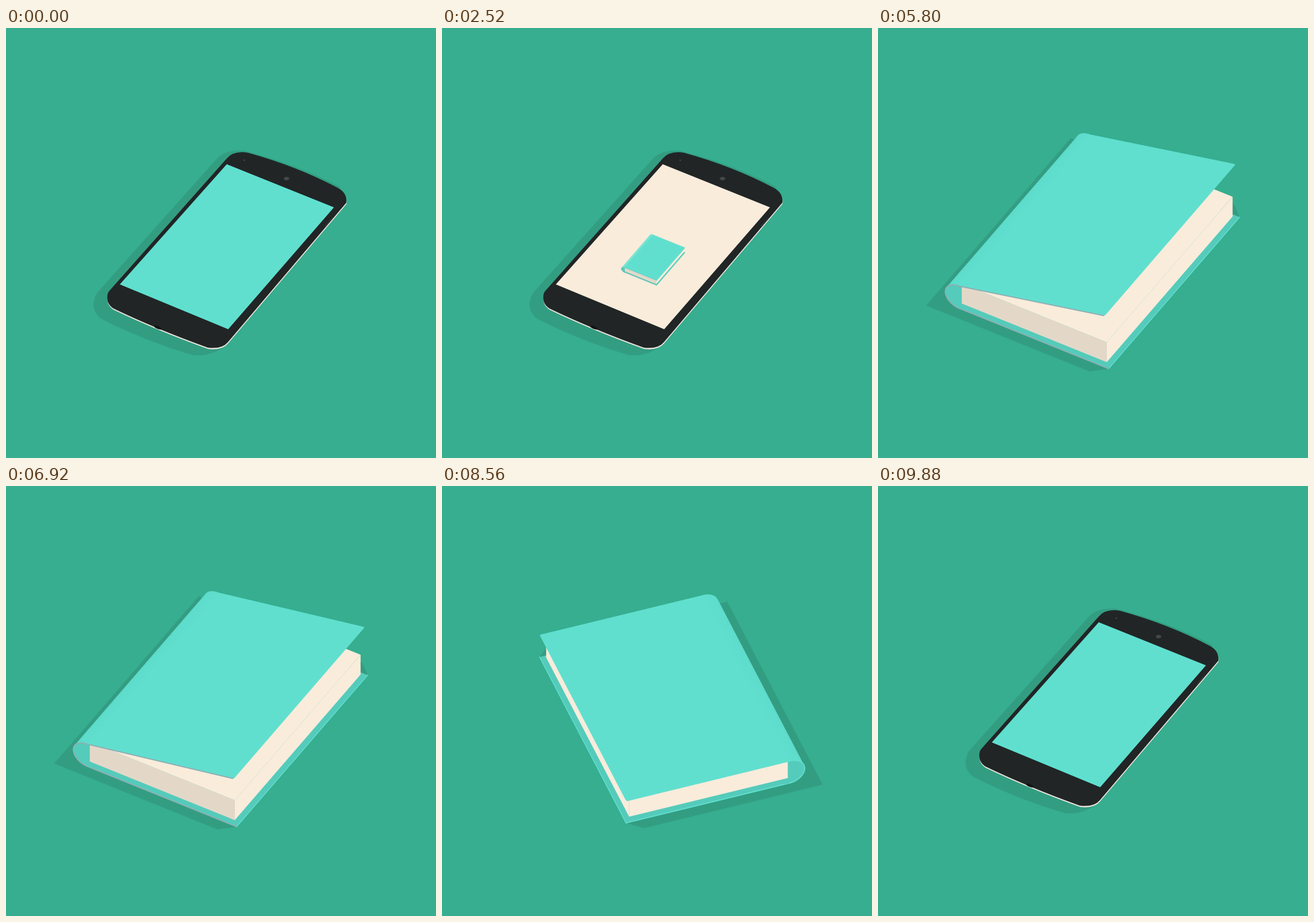
Animation, 748 px wide and 748 px high, one loop 9.92 s. Source, as an HTML page with a canvas:

```html
<!DOCTYPE html>
<html lang="en">
<head>
<meta charset="utf-8">
<title>Phone and book</title>
<style>
  html, body { margin: 0; width: 100%; height: 100%; overflow: hidden; background: #36ae8f; }
  canvas { display: block; }
</style>
</head>
<body>
<canvas id="stage" width="748" height="748"></canvas>
<script>
const ctx = document.getElementById('stage').getContext('2d');
const LOOP = 9920, STEP = 40;
const BG = '#36ae8f', SHADE = '#339d82', TEAL = '#60dfcf', DEEP = '#55cbbb',
      CREAM = '#f9ecdb', SAND = '#e3d8c8', GREY = '#8fafb3', BLACK = '#212526';

// Orthographic view: ground depth is squashed by TILT, heights by RISE.
const TILT = 0.684, RISE = 0.73, REST = 30.6;
const WIDTH = 330, LENGTH = 448, THICK = 38.5, SPINE = 28, INSET = 9;
const SCREEN = [[384, 237], [570.5, 312], [386.5, 524], [198, 446]];

const lerp = (a, b, p) => a + (b - a) * p;
const span = (t, a, b) => Math.min(1, Math.max(0, (t - a) / (b - a)));
const smooth = p => p * p * (3 - 2 * p);
const cubic = p => p < 0.5 ? 4 * p ** 3 : 1 - 4 * (1 - p) ** 3;

function poly(points, fill) {
  ctx.beginPath();
  points.forEach(p => ctx.lineTo(p[0], p[1]));
  ctx.closePath();
  ctx.fillStyle = fill;
  ctx.fill();
}

function line(points, color, width) {
  ctx.beginPath();
  points.forEach(p => ctx.lineTo(p[0], p[1]));
  ctx.strokeStyle = color;
  ctx.lineWidth = width;
  ctx.lineJoin = ctx.lineCap = 'round';
  ctx.stroke();
}

function drawBook({ x, y, s = 1, angle = REST, open = 0, shadow = 0, W = WIDTH, H = THICK }) {
  const a = angle * Math.PI / 180, cos = Math.cos(a), sin = Math.sin(a);
  // u: from spine to fore edge, v: towards the front, z: height in pixels
  const at = (u, v, z = 0) => {
    const i = u - W / 2;
    return [x + s * (i * cos - v * sin), y + s * (TILT * (i * sin + v * cos) - z)];
  };
  const half = LENGTH / 2, side = cos >= 0 ? 1 : -1;
  const end = side * half, rim = side > 0 ? GREY : TEAL;
  const thin = 2 * s;

  if (shadow > 0) {
    const off = 25 * shadow, long = half + 23 * shadow;
    poly([at(-off, long), at(W - off, long), at(W, half),
          at(W, -half), at(W - off, -long), at(-off, -long)], SHADE);
  }

  // Back board
  poly([at(SPINE, half), at(W, half), at(W, -half), at(SPINE, -half)], DEEP);
  if (sin > 0) line([at(W, half), at(W, -half)], TEAL, 1.5 * s);
  line([at(SPINE, end), at(W, end)], rim, thin);

  // Spine end: half an ellipse, carried on behind the pages
  const arc = [];
  for (let i = 0; i <= 20; i++) {
    const f = Math.PI * (0.5 + i / 20);
    arc.push([SPINE + SPINE * Math.cos(f), H / 2 * (1 + Math.sin(f))]);
  }
  const cap = arc.map(([u, z]) => at(u, end, z));
  poly([...cap, at(SPINE + INSET, end), at(SPINE + INSET, end, H)], DEEP);

  // Pages
  const low = 3 * H / THICK, high = H - low / 3, fore = W - INSET, v = half - INSET;
  const pageEnd = side * v;
  if (open > 0) poly([at(SPINE, v, high), at(fore, v, high), at(fore, -v, high), at(SPINE, -v, high)], CREAM);
  if (sin > 0) poly([at(fore, v, low), at(fore, -v, low), at(fore, -v, high), at(fore, v, high)], CREAM);
  poly([at(SPINE, pageEnd, low), at(fore, pageEnd, low), at(fore, pageEnd, high), at(SPINE, pageEnd, high)],
       side > 0 ? SAND : CREAM);

  // Spine surface, only where it faces the viewer
  for (let i = 0; i < 20; i++) {
    const [u0, z0] = arc[i], [u1, z1] = arc[i + 1];
    const p = at(u0, half, z0), q = at(u0, -half, z0), r = at(u1, -half, z1), n = at(u1, half, z1);
    if ((q[0] - p[0]) * (n[1] - p[1]) - (q[1] - p[1]) * (n[0] - p[0]) < 0) {
      poly([p, q, r, n], TEAL);
      line([p, q], TEAL, 0.7 * s);
    }
  }
  line(cap, rim, thin);

  // Front board, hinged at the spine
  const o = open * Math.PI / 180, reach = W - SPINE;
  const edge = SPINE + reach * Math.cos(o), lift = H + reach * Math.sin(o) * RISE;
  const c = 2, quad = [at(SPINE, half, H), at(edge - c, half, lift), at(edge, half - c, lift),
    at(edge, c - half, lift), at(edge - c, -half, lift), at(SPINE, -half, H)];
  poly(quad, TEAL);
  line([quad[0], quad[5]], TEAL, s);
  if (H > 1) line([at(SPINE, end, H), at(edge - c, end, lift)], rim, thin);
}

const body = new Path2D('M180 457 L384 227 Q396 213 421 217 Q506 240.5 577 278 Q594 287 592 304 ' +
  'L386 546.5 Q376 559 351 556 Q262 524 187 488 Q173 479 177 462 Q178 459 180 457 Z');
const phoneShade = new Path2D('M160 459 L368 226 Q382 212 414 213.5 Q508 238 580 276 L591 300 ' +
  'L380 553 Q358 572 325 569 Q240 544 166 506 Q144 489 157 463 Z');

function spot(x, y, rx, ry, turn, color) {
  ctx.beginPath();
  ctx.ellipse(x, y, rx, ry, turn, 0, 2 * Math.PI);
  ctx.fillStyle = color;
  ctx.fill();
}

function drawPhone(screen, scale = 1) {
  ctx.save();
  ctx.translate(384.5, 382);
  ctx.scale(scale, scale);
  ctx.translate(-384.5, -382);
  ctx.fillStyle = SHADE;
  ctx.fill(phoneShade);
  ctx.save();
  ctx.translate(0.3, 2.3);
  ctx.fillStyle = '#ece5da';
  ctx.fill(body);
  ctx.restore();
  ctx.fillStyle = BLACK;
  ctx.fill(body);
  spot(488, 262, 4.6, 3, 0, '#43484a');
  spot(414.5, 230, 1.5, 1.2, 0, '#43484a');
  spot(264, 521, 7, 2.4, 0.38, '#111516');
  poly([[555, 343], [569, 328], [568, 332], [555, 347]], '#2f3435');
  ctx.restore();
  poly(SCREEN, screen);
}

// Shelf of books scrolling up until a single one rests in the middle
function drawShelf(t) {
  ctx.save();
  ctx.beginPath();
  SCREEN.forEach(p => ctx.lineTo(p[0], p[1]));
  ctx.clip();
  const scroll = 2.15 * (1 - cubic(span(t, 280, 3160)));
  const put = (col, row) => drawBook({
    x: 385 + 186 * (col - row - scroll),
    y: 387 + 75 * col + 209 * (row + scroll),
    s: 0.2176
  });
  for (let i = 3; i >= 0; i--) {
    put(-0.19, -0.77 - 0.42 * i);
    put(0.19, -0.77 - 0.42 * i);
  }
  put(0, 0);
  const splash = 1 - smooth(span(t, 260, 800));
  if (splash > 0) {
    ctx.globalAlpha = splash;
    poly(SCREEN, TEAL);
  }
  ctx.restore();
}

function flyingBook(t) {
  const p = smooth(span(t, 3620, 4480)), fall = span(t, 4480, 4760) ** 2;
  drawBook({
    x: lerp(385, 372.5, p),
    y: lerp(387, 330, p) + 73.5 * fall,
    s: lerp(0.2176, 1, p),
    shadow: smooth(span(t, 4740, 4920))
  });
}

function restingBook(t) {
  const open = 28 * (smooth(span(t, 5270, 6370)) - smooth(span(t, 6370, 7340)));
  const angle = REST - 360 * smooth(span(t, 7392, 9358));
  const m = smooth(span(t, 8680, 9280));
  const a = angle * Math.PI / 180, u = -15 * (1 - m), v = 1 - m;
  drawBook({
    x: lerp(386.5, 384.5, m) + u * Math.cos(a) - v * Math.sin(a),
    y: lerp(408, 380, m) + TILT * (u * Math.sin(a) + v * Math.cos(a)),
    s: lerp(1, 0.81, m),
    W: lerp(WIDTH, 268, m),
    H: lerp(THICK, 0.01, m),
    shadow: 1 - m,
    angle, open
  });
}

function draw(t) {
  ctx.fillStyle = BG;
  ctx.fillRect(0, 0, 748, 748);
  if (t < 280) drawPhone(TEAL);
  else if (t < 4760) {
    drawPhone(CREAM);
    if (t < 3640) drawShelf(t);
    else flyingBook(t);
  } else if (t < 4960) flyingBook(t);
  else if (t < 9280) restingBook(t);
  else drawPhone(TEAL, lerp(0.8, 1, 1 - (1 - span(t, 9280, 9880)) ** 2));
}

const start = performance.now();
function tick() {
  const t = (performance.now() - start) % LOOP;
  draw(Math.floor(t / STEP) * STEP);
  requestAnimationFrame(tick);
}
tick();
</script>
</body>
</html>
```
